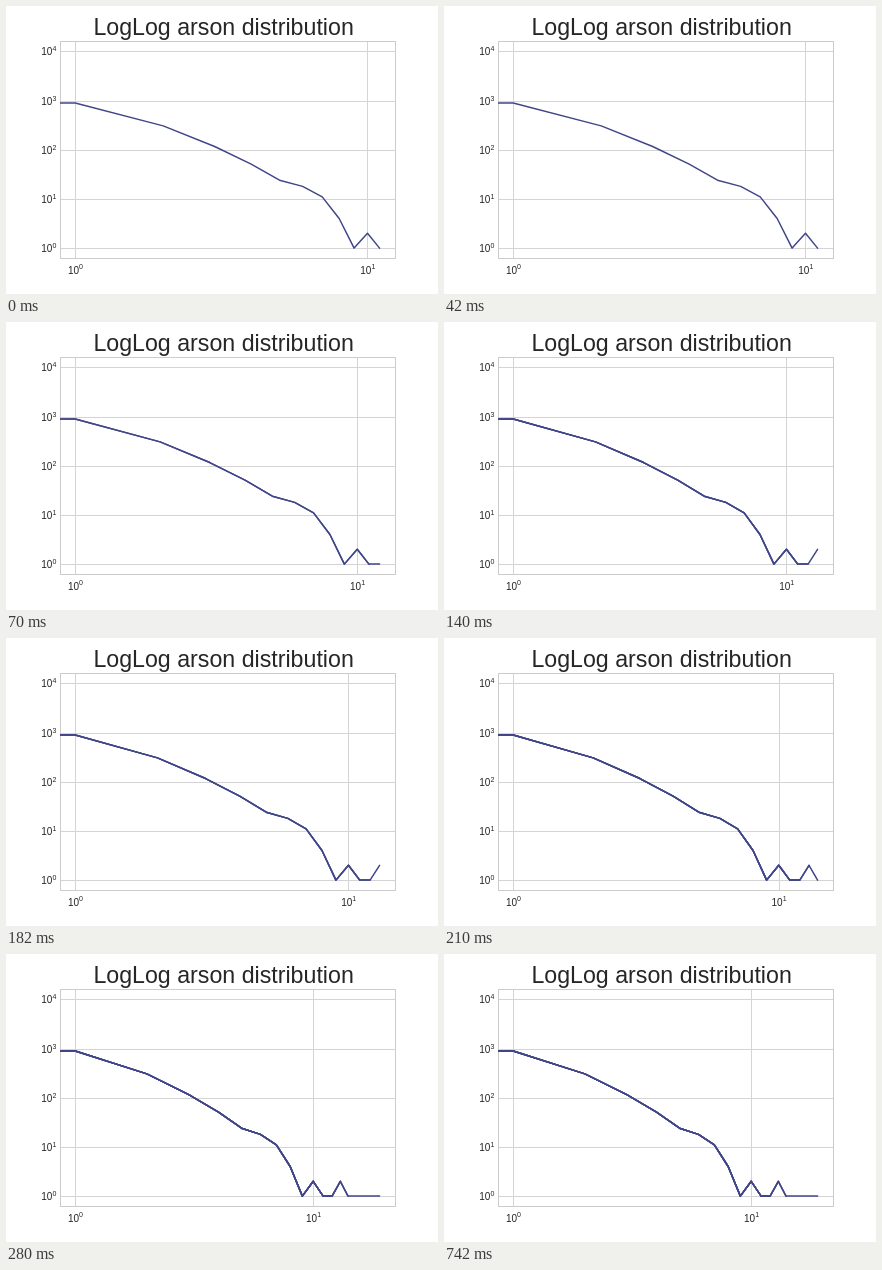
An HTML page for the animation above (1.05 s loop, 432 by 288 pixels).

```html
<!DOCTYPE html>
<html lang="en">
<head>
<meta charset="utf-8">
<title>LogLog arson distribution</title>
<style>
  html, body { margin: 0; width: 100%; height: 100%; overflow: hidden; background: #fff; }
  svg { display: block; width: 432px; height: 288px; }
  text { font-family: Arial, "Liberation Sans", sans-serif; font-size: 10px; fill: #262626; }
  .title { font-size: 23.2px; }
  .sup { font-size: 7px; }
  .grid { stroke: #d4d4d4; }
  .frame { fill: none; stroke: #ccc; }
  .curve { fill: none; stroke: #404688; stroke-width: 1.5; stroke-linejoin: round; stroke-linecap: round; }
  .step { visibility: hidden; animation: brief 1050ms step-end infinite; }
  .step:last-child { animation-name: hold; }
  @keyframes brief { 0% { visibility: visible; } 6.6666%, 100% { visibility: hidden; } }
  @keyframes hold { 0% { visibility: visible; } 73.3333%, 100% { visibility: hidden; } }
</style>
</head>
<body>
<svg viewBox="0 0 432 288">
  <defs><clipPath id="plot"><rect x="54" y="34.6" width="334.8" height="217.4"/></clipPath></defs>
  <text class="title" x="87.4" y="29">LogLog arson distribution</text>
  <g id="axes"></g>
  <g id="steps"></g>
</svg>
<script>
  const COUNTS = [890, 305, 116, 51, 24, 18, 11, 4, 1, 2, 1, 1, 2, 1, 1, 1, 1, 1, 1];
  const LIMITS = [11, 12, 13, 14, 19];
  const LEFT = 69.22, SPAN = 304.36, BASE = 242.12, DECADE = 49.2;

  const snap = v => Math.floor(v + 0.5) + 0.5;
  const xOf = (n, max) => LEFT + SPAN * Math.log(n) / Math.log(max);
  const yOf = n => BASE - DECADE * Math.log10(n);

  const power = (exp, x, y) =>
    `<text x="${x}" y="${y}">10</text><text class="sup" x="${x + 11.1}" y="${y - 4.3}">${exp}</text>`;
  const vertical = x => `<path class="grid" d="M${snap(x)} 36V252"/>`;
  const horizontal = y => `<path class="grid" d="M55 ${snap(y)}H389"/>`;
  const border = '<rect class="frame" x="54.5" y="35.5" width="335" height="217"/>';

  function curve(end, max) {
    const points = COUNTS.slice(0, end).map((c, i) => `${xOf(i + 1, max).toFixed(2)},${yOf(c).toFixed(2)}`);
    points.unshift(`40,${yOf(COUNTS[0]).toFixed(2)}`);
    return `<polyline class="curve" clip-path="url(#plot)" points="${points.join(" ")}"/>`;
  }

  let axes = vertical(LEFT) + power(0, 62, 267.6);
  for (let exp = 0; exp <= 4; exp++) {
    const y = yOf(10 ** exp);
    axes += horizontal(y) + power(exp, 35.3, Math.round(y + 4));
  }
  document.getElementById("axes").innerHTML = axes + border;

  // Every step rescales the earlier curves and adds a longer one on top.
  document.getElementById("steps").innerHTML = LIMITS.map((max, i) => {
    const ten = xOf(10, max);
    const curves = LIMITS.slice(0, i + 1).map(end => curve(end, max)).join("");
    return `<g class="step" style="animation-delay:${i * 70 - 1050}ms">` +
      vertical(ten) + power(1, ten - 7.2, 267.6) + curves + "</g>";
  }).join("");
</script>
</body>
</html>
```
